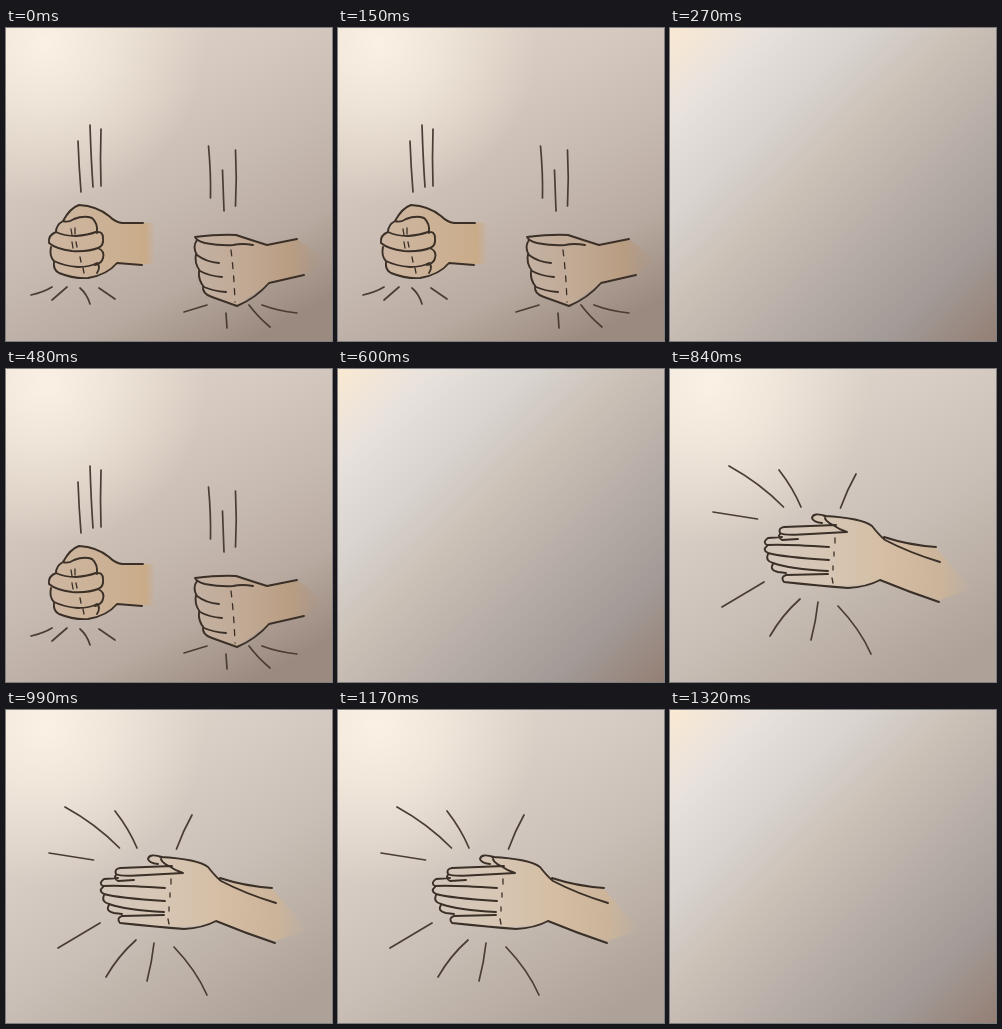
An HTML page that plays this animation: 326 px wide and 313 px high, repeating every 1.35 s.

```html
<!DOCTYPE html>
<html lang="en">
<head>
<meta charset="utf-8">
<style>
  html, body { margin: 0; width: 100%; height: 100%; overflow: hidden; background: #c8beb6; }
  svg { display: block; width: 326px; height: 313px; }
  .ink { fill: none; stroke: #3b3028; stroke-width: 1.9; stroke-linecap: round; stroke-linejoin: round; }
  .ray { stroke: #493d35; stroke-width: 1.7; }
  .thin { stroke-width: 1.3; }
</style>
</head>
<body>
<svg viewBox="0 0 326 313">
  <defs>
    <linearGradient id="blankPaper" x2="1" y2="1">
      <stop stop-color="#fae9d2"/><stop offset=".14" stop-color="#e9e2dd"/>
      <stop offset=".3" stop-color="#d9d4d0"/><stop offset=".45" stop-color="#cbc1b7"/>
      <stop offset=".65" stop-color="#b6aca6"/><stop offset=".83" stop-color="#a29a96"/>
      <stop offset="1" stop-color="#947f74"/>
    </linearGradient>
    <linearGradient id="fistPaper" x1=".2" x2=".75" y2="1">
      <stop stop-color="#e0d5ca"/><stop offset=".3" stop-color="#d5c9bf"/>
      <stop offset=".55" stop-color="#c7bab0"/><stop offset=".78" stop-color="#b8aaa0"/>
      <stop offset="1" stop-color="#9b8a7f"/>
    </linearGradient>
    <linearGradient id="clapPaper" x1=".15" x2=".8" y2="1">
      <stop stop-color="#e4dbd1"/><stop offset=".3" stop-color="#d8cec5"/>
      <stop offset=".6" stop-color="#c9bfb6"/><stop offset="1" stop-color="#aea197"/>
    </linearGradient>
    <radialGradient id="glow" gradientUnits="userSpaceOnUse" cx="40" cy="15" r="160">
      <stop stop-color="#fff6e9" stop-opacity=".85"/><stop offset=".4" stop-color="#fbf1e4" stop-opacity=".6"/>
      <stop offset="1" stop-color="#f6ebde" stop-opacity="0"/>
    </radialGradient>
    <linearGradient id="leftSkin" gradientUnits="userSpaceOnUse" x1="42" x2="150">
      <stop stop-color="#cdb6a2"/><stop offset=".6" stop-color="#cbb093"/>
      <stop offset=".9" stop-color="#c9ab88"/><stop offset="1" stop-color="#c9ab88" stop-opacity="0"/>
    </linearGradient>
    <linearGradient id="rightSkin" gradientUnits="userSpaceOnUse" x1="188" x2="318">
      <stop stop-color="#c4b1a2"/><stop offset=".4" stop-color="#c1a994"/>
      <stop offset=".75" stop-color="#b99d82"/><stop offset="1" stop-color="#ad937c" stop-opacity="0"/>
    </linearGradient>
    <linearGradient id="clapSkin" gradientUnits="userSpaceOnUse" x1="95" x2="302">
      <stop stop-color="#d3c7bc"/><stop offset=".3" stop-color="#d7c6b4"/>
      <stop offset=".6" stop-color="#d4bda2"/><stop offset=".85" stop-color="#cdb497" stop-opacity=".85"/>
      <stop offset="1" stop-color="#cdb497" stop-opacity="0"/>
    </linearGradient>
  </defs>

  <g id="blank"><rect width="326" height="313" fill="url(#blankPaper)"/></g>

  <g id="fists">
    <rect width="326" height="313" fill="url(#fistPaper)"/>
    <rect width="326" height="313" fill="url(#glow)"/>
    <path fill="url(#leftSkin)" d="M57 192Q66 177 74 177L92 180Q106 188 112 194L148 195V236L113 236Q101 246 82 250Q54 250 49 241L43 222V210L50 204Z"/>
    <path fill="url(#rightSkin)" d="M189 209Q216 205 238 209L261 217L291 211L318 232L300 246L262 256L231 278L199 267L189 235Z"/>
    <!-- falling strokes and impact marks -->
    <path class="ink ray" d="M72 113Q73 140 75 164M84 97Q85 130 87 159M95 101Q94 130 95 158
      M202.5 118Q205 145 204.5 170M216.5 142L218 183M229.5 122Q231 150 229.5 178
      M25 267Q38 264 46 259M46 272L61 259M74 260Q81 266 84 276M93 260L109 271
      M178 284L201 277M220 285L221 300M243 277Q252 289 264 299M256 277Q272 283 291 285"/>
    <!-- front fist -->
    <path class="ink" d="M57 193Q64 180 73 177Q91 178 103 188Q109 194 116 195L137 195
      M57 193Q62 195 68 191Q78 187 86 190Q92 195 91 205
      M57 193Q50 197 50 204Q58 208 70 208Q82 207 90 204Q97 203 97 210Q98 218 92 220
      M50 204Q42 207 43 215Q50 221 66 223Q82 224 92 220Q99 223 97 230Q96 235 89 237
      M45 219Q43 228 48 233Q58 238 72 239Q84 239 91 235Q95 239 91 245
      M48 234Q47 242 53 245Q68 251 82 250Q101 247 111 235L136 237"/>
    <path class="ink thin" d="M65 201L66 207M69 200V206M66 214L67 220M70 214L71 219M74 229L75 234M77 240L78 245"/>
    <!-- side fist -->
    <path class="ink" d="M189 209Q214 206 230 207Q245 212 261 217L291 211
      M189 209Q191 213 199 215Q216 218 227 217Q236 215 247 217
      M191 212Q186 219 191 227Q200 234 213 235
      M190 226Q188 235 194 243Q203 248 216 249
      M193 243Q192 252 198 259Q207 263 220 264
      M197 258Q196 266 206 269L231 278Q250 270 263 255L298 247"/>
    <path class="ink thin" stroke-dasharray="6 7" d="M225 222Q228 246 229 274"/>
  </g>

  <g id="clap">
    <rect width="326" height="313" fill="url(#clapPaper)"/>
    <rect width="326" height="313" fill="url(#glow)"/>
    <path fill="url(#clapSkin)" d="M142 149Q147 144 178 149Q200 152 216 171L266 179L302 220L269 231L210 212Q184 221 114 213L112 205L99 200L95 172L112 167L110 159L150 156Z"/>
    <!-- rays -->
    <path class="ink ray" d="M59 97Q90 114 113.5 138M109 101Q123 119 131 138M186 105Q177 121 170.5 139M43 143L87.5 150
      M94 213L52 238M130 230Q112 246 100 267M148 233Q146 252 141 271M168 237Q190 260 201 285"/>
    <!-- hands -->
    <path class="ink" d="M154 147Q192 149 202 157Q209 166 215 171Q240 184 270 193M214 168Q238 176 266 178
      M156 147Q143 143 142 149Q143 153 152 154M155 147Q154 152 163 156Q170 161 177 163
      M166 156L114 158Q108 159 110 164Q114 167 140 165L177 163
      M112 168L98 169Q92 173 97 176Q114 175 159 178
      M110 165Q107 168 112 171L128 170
      M97 177Q92 181 98 184Q112 188 159 191
      M98 185Q95 192 103 194Q120 200 158 202
      M103 195Q99 201 108 203L116 204
      M158 205L116 206Q110 208 114 213Q152 217 178 219Q197 218 210 211Q239 223 269 233"/>
    <path class="ink thin" d="M165 169V174M164 183V187M163 197V201M162 209L163 214"/>
  </g>
</svg>
<script>
  const LOOP = 1350;
  const cuts = [[0, 'fists'], [270, 'blank'], [330, 'fists'], [600, 'blank'], [660, 'clap'], [1290, 'blank']];
  const scenes = document.querySelectorAll('svg > g');

  function draw() {
    const time = performance.now() % LOOP;
    const current = cuts.findLast(([start]) => start <= time)[1];
    for (const scene of scenes) scene.style.display = scene.id === current ? '' : 'none';
    requestAnimationFrame(draw);
  }
  draw();
</script>
</body>
</html>
```
